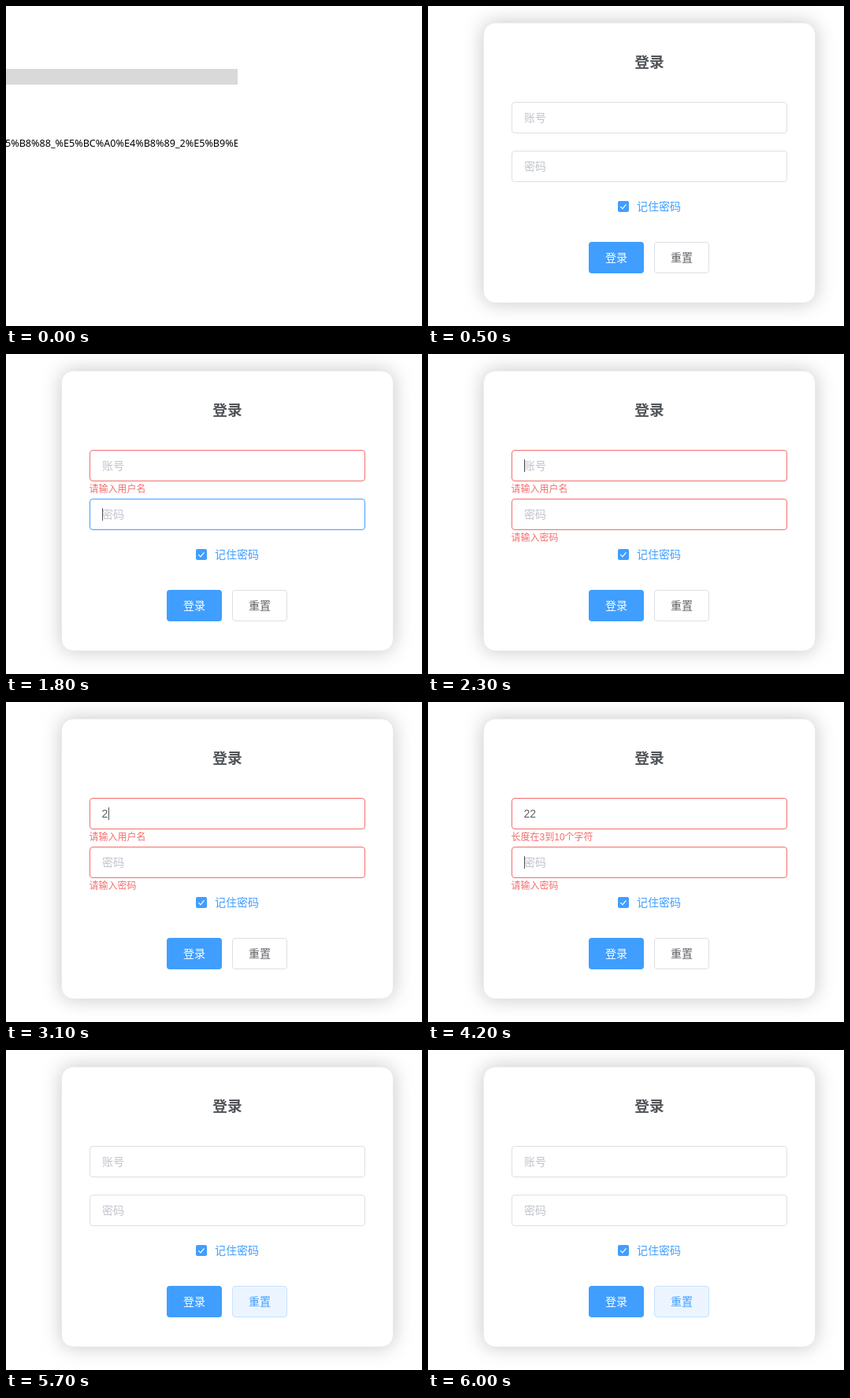
Write an HTML page that moves like this. It is 528 px wide and 407 px high and loops after 8 s.

```html
<!DOCTYPE html>
<html lang="zh-CN">
<head>
<meta charset="utf-8">
<title>登录</title>
<style>
  html, body { margin: 0; width: 100%; height: 100%; overflow: hidden; background: #fff; }
  svg { display: block; font: 14px "Liberation Sans", "Noto Sans CJK SC", "Noto Sans CJK", sans-serif; fill: #606266; }
  .shadow { fill: #cac6c6; filter: blur(12.5px); }
  .card { fill: #fff; stroke: #eaeaea; }
  .title { font-size: 18.72px; font-weight: bold; fill: #505458; }
  .mid { text-anchor: middle; }
  .field { fill: #fff; }
  .hint { fill: #c0c4cc; }
  .error { font-size: 12px; fill: #f56c6c; }
  .caret { fill: #505256; }
  .blue { fill: #409eff; }
  .url { font: 12.6px "Noto Sans", "Open Sans", sans-serif; fill: #000; }
</style>
</head>
<body>
<svg width="528" height="407" viewBox="0 0 528 407">
  <defs><clipPath id="bar"><rect width="294" height="407"/></clipPath></defs>
  <g id="intro" clip-path="url(#bar)">
    <rect y="80" width="294" height="20" fill="#d9d9d9"/>
    <text class="url" x="-1" y="179">5%B8%88_%E5%BC%A0%E4%B8%89_2%E5%B9%E</text>
  </g>
  <g id="login">
    <rect class="shadow" x="70" y="21" width="422" height="357" rx="15"/>
    <rect class="card" x="70.5" y="21.5" width="421" height="356" rx="14.5"/>
    <text class="title mid" x="281" y="78">登录</text>

    <rect id="nameBox" class="field" x="106.5" y="122.5" width="349" height="39" rx="3.5"/>
    <text id="nameHint" class="hint" x="122" y="147">账号</text>
    <text id="nameText" x="121.5" y="147"></text>
    <text id="nameError" class="error" x="105.6" y="176.3"></text>

    <rect id="passBox" class="field" x="106.5" y="184.5" width="349" height="39" rx="3.5"/>
    <text class="hint" x="122" y="209">密码</text>
    <text id="passError" class="error" x="105.6" y="238.3">请输入密码</text>
    <rect id="caret" class="caret" width="1" height="16"/>

    <rect class="blue" x="241" y="248" width="14" height="14" rx="2"/>
    <path d="M244.3 255.2l2.6 2.7 4.6-5.6" fill="none" stroke="#fff" stroke-width="1.2"/>
    <text class="blue" x="265" y="260">记住密码</text>

    <rect class="blue" x="204" y="300" width="70" height="40" rx="4"/>
    <text class="mid" x="239" y="325" fill="#fff">登录</text>
    <rect id="resetBox" x="287.5" y="300.5" width="69" height="39" rx="3.5"/>
    <text id="resetText" class="mid" x="322" y="325">重置</text>
  </g>
</svg>
<script>
const LOOP = 8000, STEP = 100;
const IDLE = [220, 223, 230], HOVER = [192, 196, 204], FOCUS = [64, 158, 255], ERROR = [245, 108, 108];

// Border colour changes: [start, colour, duration]
const nameBorder = [[0, IDLE, 0], [700, HOVER, 0], [900, FOCUS, 200], [1600, ERROR, 200], [5500, IDLE, 200]];
const passBorder = [[0, IDLE, 0], [1300, HOVER, 100], [1600, FOCUS, 200], [2100, ERROR, 200], [5500, IDLE, 200]];

// Caret on-times: [from, to, x, y]
const carets = [
  [900, 1400, 122, 134], [1600, 2100, 122, 196], [2100, 2600, 122, 134],
  [3100, 3300, 130, 134], [3300, 3800, 138, 134],
  [4100, 4600, 122, 196], [5100, 5500, 122, 196]
];

const el = id => document.getElementById(id);
const set = (id, attrs) => { for (const k in attrs) el(id).setAttribute(k, attrs[k]); };
const show = (id, on) => set(id, { visibility: on ? "visible" : "hidden" });
const progress = (t, start, len) => len ? Math.min(1, Math.max(0, (t - start) / len)) : +(t >= start);
const inOut = p => p < 0.5 ? 4 * p ** 3 : 1 - 4 * (1 - p) ** 3;
const out = p => 1 - (1 - p) ** 5;

function colorAt(keys, t) {
  let c = keys[0][1];
  for (const [start, to, len] of keys) {
    const p = inOut(progress(t, start, len));
    c = c.map((v, i) => v + (to[i] - v) * p);
  }
  return `rgb(${c.map(Math.round)})`;
}

// Errors unfold from the lower edge of their field.
function unfold(id, t, start, top) {
  const k = out(progress(t, start, 300)) * (1 - out(progress(t, 5500, 300)));
  set(id, { opacity: k, transform: `translate(0 ${top}) scale(1 ${k}) translate(0 ${-top})` });
}

function draw(t) {
  const open = t >= 500;
  el("intro").style.display = open ? "none" : "";
  el("login").style.display = open ? "" : "none";

  set("nameBox", { stroke: colorAt(nameBorder, t) });
  set("passBox", { stroke: colorAt(passBorder, t) });

  const value = t < 3100 || t >= 5500 ? "" : t < 3300 ? "2" : "22";
  el("nameText").textContent = value;
  show("nameHint", open && !value);

  el("nameError").textContent = t < 4100 ? "请输入用户名" : "长度在3到10个字符";
  unfold("nameError", t, 1600, 162);
  unfold("passError", t, 2100, 224);

  const caret = carets.find(([from, to]) => t >= from && t < to);
  show("caret", caret);
  if (caret) set("caret", { x: caret[2], y: caret[3] });

  const hover = t >= 4600, pressed = t >= 5500 && t < 5600;
  set("resetBox", {
    fill: hover ? "#ecf5ff" : "#fff",
    stroke: pressed ? "#3a8ee6" : hover ? "#c6e2ff" : "#dcdfe6"
  });
  set("resetText", { fill: pressed ? "#3a8ee6" : hover ? "#409eff" : "#606266" });
}

const begin = performance.now();
function tick() {
  const t = (performance.now() - begin) % LOOP;
  draw(Math.floor(t / STEP) * STEP);
  requestAnimationFrame(tick);
}
tick();
</script>
</body>
</html>
```
